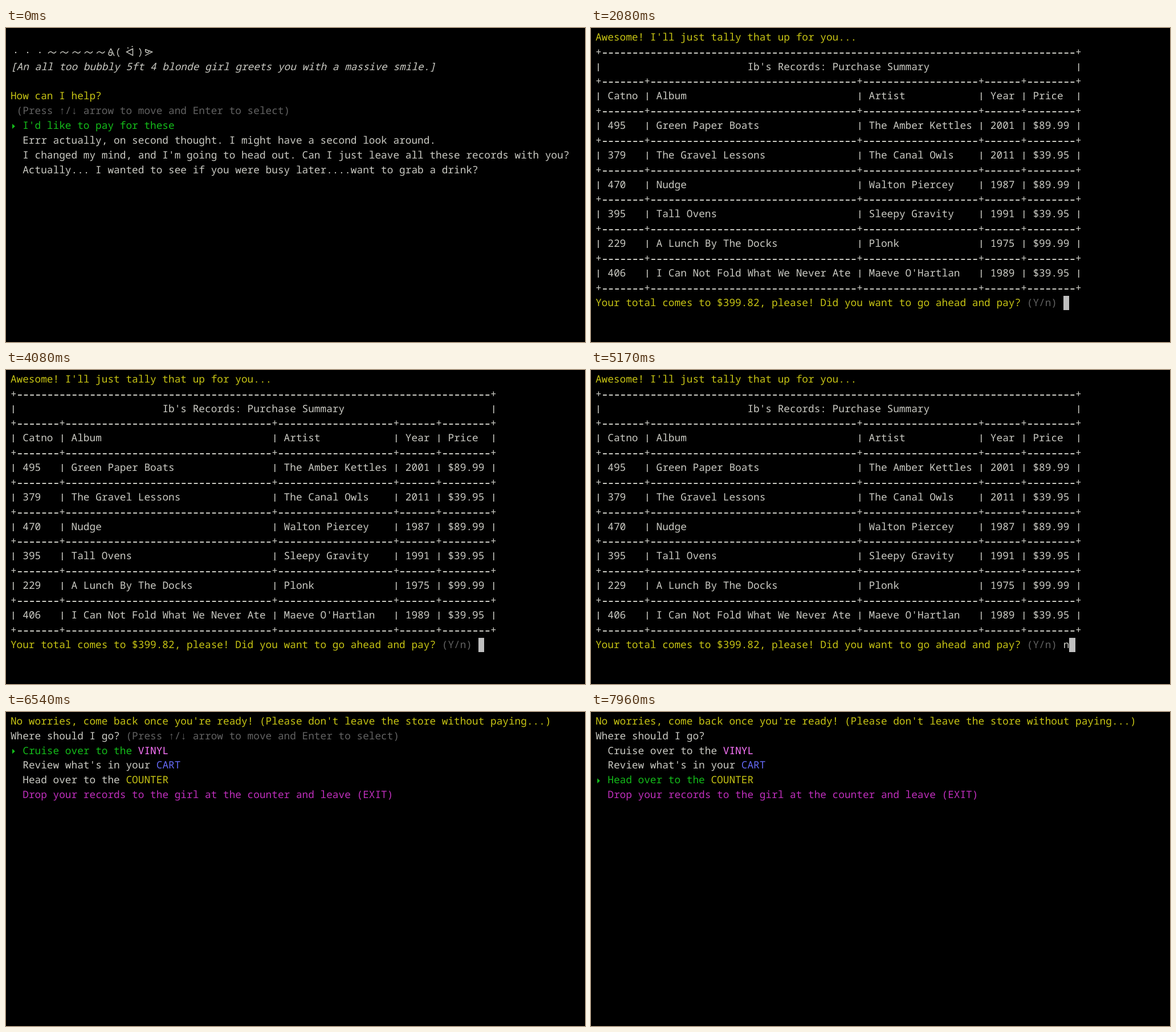
These frames come from a looping animation (1016 by 551 pixels, 8000 ms). An HTML page:

```html
<!DOCTYPE html>
<html lang="en">
<head>
<meta charset="utf-8">
<title>Record store terminal</title>
<style>
  :root { --fg: #cbcbc4; --yellow: #c8c514; --green: #14bd1a; --dim: #626262; --row: 25.87px; }
  html, body { margin: 0; width: 100%; height: 100%; overflow: hidden; background: #000; }
  pre {
    position: absolute; left: 7.9px; top: 3.8px; margin: 0;
    font: 17.78px/var(--row) "Noto Sans Mono", "DejaVu Sans Mono", monospace;
    text-rendering: geometricPrecision; font-variant-ligatures: none;
    color: var(--fg); white-space: pre;
  }
  em { font-style: oblique; }
  .yellow { color: var(--yellow); }
  .green { color: var(--green); }
  .dim { color: var(--dim); }
  .pink { color: #ff76ff; }
  .blue { color: #6469f5; }
  .purple { color: #c02fbd; }

  .bar, .dash, .typed, .cursor { display: inline-block; height: var(--row); vertical-align: top; }
  .bar, .dash { color: transparent; background-repeat: no-repeat; }
  .bar {
    background-image: linear-gradient(var(--fg), var(--fg));
    background-size: 1.5px 14px; background-position: 50% 6px;
  }
  .dash {
    background-image: linear-gradient(90deg, transparent 16%, var(--fg) 16% 84%, transparent 84%);
    background-size: 1ch 1.5px; background-position: 0 13px; background-repeat: repeat-x;
  }
  .cursor { width: 1ch; background: #bfbfbf; }
  .pointer {
    position: absolute; left: 3px; width: 5px; height: 9px;
    background: var(--green); clip-path: polygon(0 0, 100% 50%, 0 100%);
  }
  #greet .pointer { top: calc(6 * var(--row) + 9px); }
  #menu .pointer { top: calc(2 * var(--row) + 9px); }
  svg { position: absolute; left: 0; top: 0; fill: none; stroke: var(--fg); stroke-width: 1.4; }

  .scene, .typed, .hint, .pick, #menu .pointer { animation: 8s step-end infinite; }
  #greet { animation-name: greet; }
  #bill { animation-name: bill; }
  #menu { animation-name: menu; }
  .typed { overflow: hidden; animation-name: typed; }
  .hint { animation-name: hint; }
  #menu .pointer { animation-name: move; }
  .first { animation-name: first; }
  .second { animation-name: second; }
  .third { animation-name: third; }

  @keyframes greet { 0% { opacity: 1 } 11.5%, 100% { opacity: 0 } }
  @keyframes bill { 0% { opacity: 0 } 11.5% { opacity: 1 } 72.875%, 100% { opacity: 0 } }
  @keyframes menu { 0% { opacity: 0 } 72.875%, 100% { opacity: 1 } }
  @keyframes typed { 0% { width: 0 } 63.75%, 100% { width: 1ch } }
  @keyframes hint { 0% { opacity: 1 } 90.625%, 100% { opacity: 0 } }
  @keyframes move {
    0% { transform: none }
    90.625% { transform: translateY(var(--row)) }
    95%, 100% { transform: translateY(calc(2 * var(--row))) }
  }
  @keyframes first { 0% { color: var(--green) } 90.625%, 100% { color: var(--fg) } }
  @keyframes second { 0% { color: var(--fg) } 90.625% { color: var(--green) } 95%, 100% { color: var(--fg) } }
  @keyframes third { 0% { color: var(--fg) } 95%, 100% { color: var(--green) } }
</style>
</head>
<body>
<div class="scene" id="greet">
<svg width="300" height="60">
  <g fill="#cbcbc4" stroke="none">
    <circle cx="17" cy="43" r="1.2"/><circle cx="38" cy="43" r="1.2"/><circle cx="59.5" cy="43" r="1.2"/>
    <circle cx="214" cy="35" r="1.1"/><circle cx="221.5" cy="32.5" r="1.1"/>
  </g>
  <path id="wave" d="M74 44.5q3.5-5 7-1.7t7-1.7"/>
  <use href="#wave" x="21.3"/><use href="#wave" x="42.7"/><use href="#wave" x="64"/><use href="#wave" x="85.3"/>
  <path d="M184 36l-4 8c-1 5 6 6 6 1c0-3-3-3-4-1M184 36l6 13"/>
  <path d="M198.500 35.500q-6 7.500 0 15M234 35.500q6 7.500 0 15"/>
  <path d="M222.500 36.500l-11 5.500l11 6z"/>
  <path d="M244 37.500l12.500 4.500l-12.500 6.500M245 38c-2 6 6 7 6 2"/>
</svg>
<!-- the parser drops the first line break inside pre -->
<pre>


<em>[An all too bubbly 5ft 4 blonde girl greets you with a massive smile.]</em>

<span class="yellow">How can I help?</span>
<span class="dim"> (Press ↑/↓ arrow to move and Enter to select)</span>
<span class="green">  I'd like to pay for these</span>
  Errr actually, on second thought. I might have a second look around.
  I changed my mind, and I'm going to head out. Can I just leave all these records with you?
  Actually... I wanted to see if you were busy later....want to grab a drink?<span class="pointer"></span></pre>
</div>

<div class="scene" id="bill"><pre></pre></div>

<div class="scene" id="menu">
<pre><span class="yellow">No worries, come back once you're ready! (Please don't leave the store without paying...)</span>
Where should I go? <span class="dim hint">(Press ↑/↓ arrow to move and Enter to select)</span>
  <span class="pick first">Cruise over to the</span> <span class="pink">VINYL</span>
  <span class="pick second">Review what's in your</span> <span class="blue">CART</span>
  <span class="pick third">Head over to the</span> <span class="yellow">COUNTER</span>
  <span class="purple">Drop your records to the girl at the counter and leave (EXIT)</span><span class="pointer"></span></pre>
</div>

<script>
  const widths = [7, 34, 19, 6, 8];
  const records = [
    ["Catno", "Album", "Artist", "Year", "Price"],
    ["495", "Green Paper Boats", "The Amber Kettles", "2001", "$89.99"],
    ["379", "The Gravel Lessons", "The Canal Owls", "2011", "$39.95"],
    ["470", "Nudge", "Walton Piercey", "1987", "$89.99"],
    ["395", "Tall Ovens", "Sleepy Gravity", "1991", "$39.95"],
    ["229", "A Lunch By The Docks", "Plonk", "1975", "$99.99"],
    ["406", "I Can Not Fold What We Never Ate", "Maeve O'Hartlan", "1989", "$39.95"]
  ];
  const span = (name, text) => `<span class="${name}">${text}</span>`;
  const bar = span("bar", "|");
  const rule = cols => "+" + cols.map(n => span("dash", "-".repeat(n)) + "+").join("");
  const line = cells => bar + cells.map((c, i) => (" " + c).padEnd(widths[i]) + bar).join("");
  const title = (" ".repeat(24) + "Ib's Records: Purchase Summary").padEnd(78);

  document.querySelector("#bill pre").innerHTML = [
    span("yellow", "Awesome! I'll just tally that up for you..."),
    rule([78]),
    bar + title + bar,
    rule(widths),
    ...records.flatMap(r => [line(r), rule(widths)]),
    span("yellow", "Your total comes to $399.82, please! Did you want to go ahead and pay?") +
      " " + span("dim", "(Y/n)") + " " + span("typed", "n") + span("cursor", "")
  ].join("\n");
</script>
</body>
</html>
```
